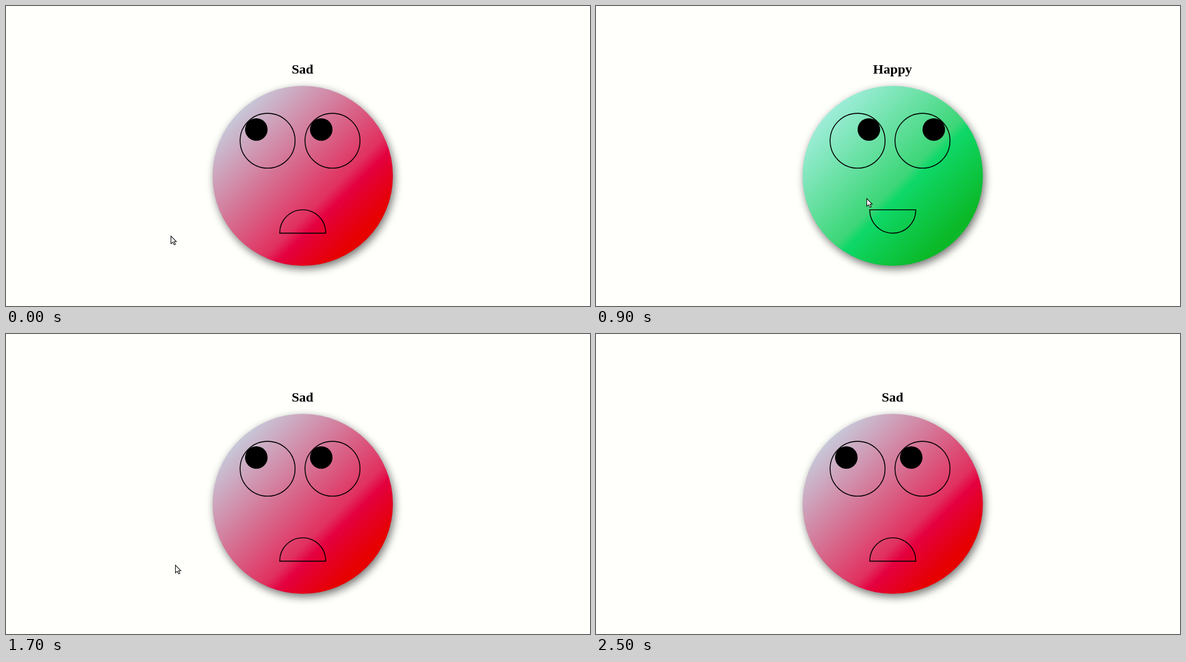
Write an HTML page that moves like this. It is 1043 px wide and 537 px high and loops after 3300 ms.

```html
<!DOCTYPE html>
<html lang="en">
<head>
<meta charset="utf-8">
<title>Mood face</title>
<style>
  html, body { margin: 0; width: 100%; height: 100%; overflow: hidden; background: #fffffc; }
  svg { display: block; width: 100vw; height: 100vh; }
  #face { filter: drop-shadow(4px 7px 9px rgba(0, 0, 0, .55)); }
  #mood { font: bold 24.1px "Liberation Serif", "Times New Roman", serif; text-anchor: middle; }
  .line { fill: none; stroke: #000; stroke-width: 2; }
</style>
</head>
<body>
<svg viewBox="0 0 1043 537">
  <defs>
    <linearGradient id="sad" x1="0" y1="0" x2="1" y2="1">
      <stop offset=".146" stop-color="#c7c8d9"/>
      <stop offset=".62" stop-color="#e1305f"/>
      <stop offset=".67" stop-color="#e4003f"/>
      <stop offset=".82" stop-color="#e60000"/>
    </linearGradient>
    <linearGradient id="happy" x1="0" y1="0" x2="1" y2="1">
      <stop offset=".146" stop-color="#9eedd9"/>
      <stop offset=".535" stop-color="#3cd677"/>
      <stop offset=".57" stop-color="#0fd869"/>
      <stop offset=".82" stop-color="#0bb928"/>
    </linearGradient>
  </defs>
  <text id="mood" x="529.6" y="121"></text>
  <g transform="translate(530 304) scale(.805)">
    <circle id="face" r="200"/>
    <g class="line">
      <circle cx="-78" cy="-78" r="61"/>
      <circle cx="66" cy="-78" r="61"/>
      <path id="mouth" d="M-51 -26H51V-25A51 51 0 0 1 -51 -25Z"/>
    </g>
    <g id="pupils">
      <circle cx="-78" cy="-103" r="25"/>
      <circle cx="66" cy="-103" r="25"/>
    </g>
  </g>
  <path id="pointer" d="M0 0V13.8L3.3 10.8L5.6 15.6L7.9 14.6L5.7 9.9H9.6Z"
        fill="#fff" stroke="#000" stroke-width="1.1"/>
</svg>
<script>
const LOOP = 3300, STEP = 100;
const HAPPY_FROM = 600, HAPPY_TO = 1500;

const linear = u => u;
const sineOut = u => Math.sin(u * Math.PI / 2);
const cubicOut = u => 1 - (1 - u) ** 3;

// Each stroke carries the pointer on from where the last one ended.
const home = { x: 294, y: 411 };
const strokes = [
  { from: 400, to: 900, x: 483, y: 344, ease: sineOut },
  { from: 1300, to: 1700, x: 302, y: 413, ease: cubicOut },
  { from: 1900, to: 2000, x: 190, y: 174, ease: linear },
  { from: 2000, to: 2100, x: 177, y: 120, ease: linear },
  { from: 2200, to: 2500, x: 21, y: -57, ease: linear }
];

const el = id => document.getElementById(id);
const set = (id, name, value) => el(id).setAttribute(name, value);

function pointerAt(t) {
  let { x, y } = home;
  for (const s of strokes) {
    const u = Math.min(1, Math.max(0, (t - s.from) / (s.to - s.from)));
    const k = s.ease(u);
    x += (s.x - x) * k;
    y += (s.y - y) * k;
  }
  return { x, y };
}

function draw(time) {
  const t = Math.floor(time / STEP) * STEP;
  const happy = t >= HAPPY_FROM && t < HAPPY_TO;
  const side = happy ? 1 : -1;
  el("mood").textContent = happy ? "Happy" : "Sad";
  set("face", "fill", happy ? "url(#happy)" : "url(#sad)");
  set("mouth", "transform", `translate(0 101.5) scale(1 ${side})`);
  set("pupils", "transform", `translate(${25 * side} 0)`);

  const p = pointerAt(t);
  set("pointer", "transform", `translate(${p.x + .6} ${p.y + .8})`);
}

const start = performance.now();
function tick() {
  draw((performance.now() - start) % LOOP);
  requestAnimationFrame(tick);
}
tick();
</script>
</body>
</html>
```
